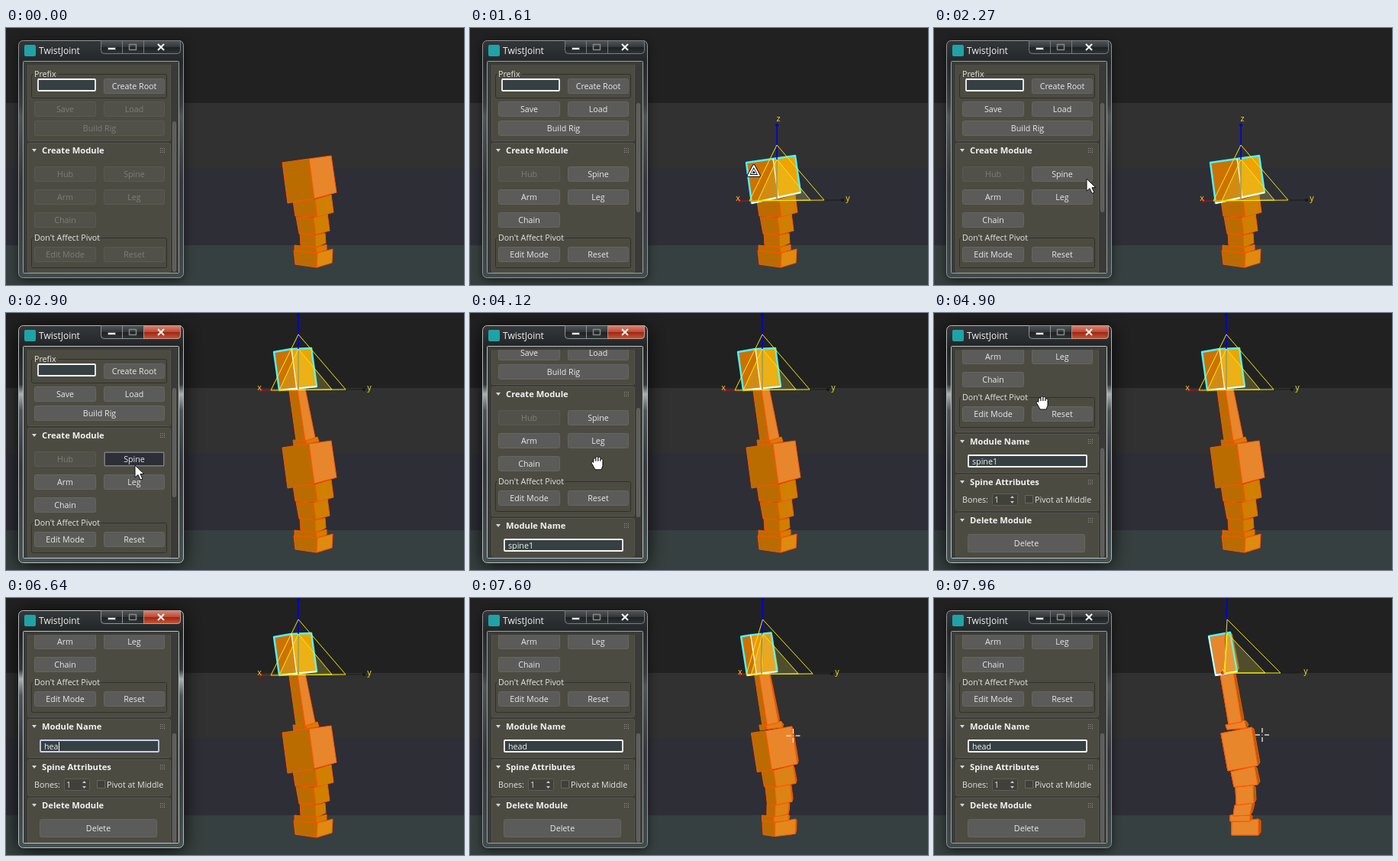
These frames come from a looping animation (600x336 px, 8000 ms). An HTML page with a canvas:

```html
<!DOCTYPE html>
<html lang="en">
<head>
<meta charset="utf-8">
<title>Rig panel</title>
<style>
html, body { margin: 0; width: 100%; height: 100%; overflow: hidden; background: #212121; }
canvas { display: block; width: 100%; height: 100%; }
</style>
</head>
<body>
<canvas id="stage" width="600" height="336"></canvas>
<script>
const LOOP = 8000;
const ctx = document.getElementById('stage').getContext('2d');
const FONT = '"Open Sans", sans-serif';

// ---------- helpers ----------
const mix = (a, b, u) => a + (b - a) * u;
const mixPoint = (p, q, u) => [mix(p[0], q[0], u), mix(p[1], q[1], u)];
const clamp = v => Math.max(0, Math.min(1, v));
const ease = u => u * u * (3 - 2 * u);

// keys: [time, ...values]
function track(keys, t) {
  let i = 0;
  while (i < keys.length - 2 && t >= keys[i + 1][0]) i++;
  const [a, b] = [keys[i], keys[i + 1]];
  const u = clamp((t - a[0]) / (b[0] - a[0]));
  return a.slice(1).map((v, k) => mix(v, b[k + 1], u));
}
function rect(x, y, w, h, fill, stroke, radius = 0, line = 1) {
  ctx.beginPath();
  ctx.roundRect(x, y, w, h, radius);
  if (fill) { ctx.fillStyle = fill; ctx.fill(); }
  if (stroke) { ctx.strokeStyle = stroke; ctx.lineWidth = line; ctx.stroke(); }
}
function poly(points, fill, stroke, line = 1, closed = true) {
  ctx.beginPath();
  points.forEach(p => ctx.lineTo(p[0], p[1]));
  if (closed) ctx.closePath();
  if (fill) { ctx.fillStyle = fill; ctx.fill(); }
  if (stroke) { ctx.strokeStyle = stroke; ctx.lineWidth = line; ctx.lineJoin = 'round'; ctx.stroke(); }
}
const path = (points, stroke, line) => poly(points, null, stroke, line, false);
function text(s, x, y, color = '#e4e4e4', align = 'left', font = '10.7px') {
  ctx.font = `${font} ${FONT}`;
  ctx.textAlign = align;
  ctx.textBaseline = 'alphabetic';
  ctx.fillStyle = color;
  ctx.fillText(s, x, y + 4);
}
function vertical(y0, y1, ...stops) {
  const g = ctx.createLinearGradient(0, y0, 0, y1);
  stops.forEach(([at, color]) => g.addColorStop(at, color));
  return g;
}

// ---------- model ----------
const pairs = list => list.reduce((out, v, i) => (i % 2 ? out[out.length - 1].push(v) : out.push([v]), out), []);

// from: top left, middle, right, then bottom right, middle, left; to: the turned front face
function box(from, to, front = '#cf8000') {
  const [tl, tr, br, bl] = pairs(to);
  return { from: pairs(from), to: [tl, tl, tr, br, bl, bl], front };
}
const base = box([377,291, 408,294, 428,289, 427,307, 407,313, 379,309], [390,293, 425,289, 425,310, 390,310], '#e08a10');
const slab = box([378,284, 406,287, 420,283, 420,290, 407,294, 378,291], [388,284, 414,283, 414,292, 388,292]);
const shin = box([385,268, 405,271, 418,268, 419,281, 406,287, 386,284], [394,271, 417,267, 414,284, 392,285]);
const thigh = box([380,247, 403,248, 421,242, 424,265, 406,270, 384,269], [395,247, 418,245, 419,268, 396,271]);
const hip = box([376,226, 405,224, 426,218, 429,241, 408,247, 379,246], [389,227, 420,220, 424,244, 393,247]);
const torso = box([362,176, 397,171, 426,167, 433,215, 404,223, 369,229], [376,177, 416,169, 424,219, 385,226], '#e8862c');
const collar = box([376,166, 393,167, 408,162, 410,168, 394,171, 377,174], [382,166, 407,160, 409,170, 384,172]);
const neck = box([371,102, 382,101, 392,99, 405,163, 392,167, 380,166], [375,100, 392,97, 403,162, 386,165], '#e8862c');
const head = box([351,51, 374,47, 400,46, 407,96, 381,101, 358,101], [360,50, 388,45, 397,96, 369,101], '#eea400');

const body = [base, slab, shin, thigh, hip, torso];
const grown = [base, slab, shin, thigh, hip, collar, neck, torso, head];

function drawBox(b, u, selected) {
  const [tl, tm, tr, br, bm, bl] = b.from.map((p, i) => mixPoint(p, b.to[i], u));
  const edge = selected ? null : '#ff5500';
  const side = 3 * u;
  if (u > 0) poly([tr, [tr[0] + side, tr[1] + 2], [br[0] + side, br[1] - 4], br], '#a86200', edge);
  poly([tl, tm, bm, bl], selected ? '#cc7200' : '#bb6c00', edge);
  ctx.globalAlpha = 1;
  poly([tm, tr, br, bm], selected ? '#eea400' : b.front, edge);
  if (u > 0) {
    ctx.globalAlpha = u;
    poly([tm, tr, br, bm], '#e8862c', edge);
    ctx.globalAlpha = 1;
  }
  if (!selected) return;
  poly([tl, tm, tr, br, bl], null, '#4cf4ff', 2.4);
  path([tm, bm], '#fff', 1.3);
  path([bl, br], '#fff', 1.8);
}

function drawGizmo(u, dx, dy) {
  const at = (x0, y0, x1, y1) => [mix(x0, x1, u) + dx, mix(y0, y1, u) + dy];
  const origin = at(383, 101, 381, 98);
  const apex = at(383, 28, 384, 28), innerApex = at(383, 47, 384, 46);
  const left = at(347, 101, 380, 98), innerLeft = at(358, 101, 381, 98);
  const right = at(445, 100, 454, 98), innerRight = at(427, 100, 434, 98);
  const tipX = at(334, 101, 378, 98), tipY = at(469, 100, 480, 98), tipZ = at(383, 2, 384, -2);
  path([origin, tipZ], '#0000d8', 1.5);
  path([origin, tipX], '#b01818');
  path([right, tipY], '#1a1a1a');
  poly([innerApex, innerLeft, innerRight], 'rgba(225,215,90,.24)');
  poly([apex, left, right], null, '#f8ec00');
  poly([innerApex, innerLeft, innerRight], null, '#f8ec00');
  path([innerApex, origin], '#f8ec00');
  rect(tipZ[0] - 2, tipZ[1] - 2, 4, 4, '#0000c8', null, 2);
  rect(tipX[0] - 2, tipX[1] - 2, 4, 4, '#c01010', null, 2);
  if (u < 1) rect(tipY[0] - 2, tipY[1] - 2, 4, 4, '#15151c', null, 2);
  const [lx, ly] = at(332, 97, 380, 95), [yx, yy] = at(476, 97, 487, 95);
  text('x', lx, ly, '#ffd22a', 'center');
  text('y', yx, yy, '#f4e71c', 'center');
  text('z', tipZ[0] + 2, tipZ[1] - 9, '#f4e71c', 'center');
}

function drawViewport(t) {
  [[0, 98, '#212121'], [98, 85, '#313131'], [183, 101, '#2e2e37'], [284, 52, '#374040']]
    .forEach(([y, h, color]) => rect(0, y, 600, h, color));
  const turn = clamp((t - 7300) / 660);
  const extended = t >= 2840;
  const active = extended ? head : t >= 1210 ? torso : null;
  (extended ? grown : body).forEach(b => drawBox(b, turn, b === active));
  if (active === head) drawGizmo(turn, 0, 0);
  else if (active) drawGizmo(0, 19, 125);
}

// ---------- window ----------
function drawFrame(active) {
  ctx.save();
  ctx.shadowColor = active ? 'rgba(0,0,0,.85)' : 'rgba(0,0,0,.6)';
  ctx.shadowBlur = active ? 26 : 14;
  ctx.shadowOffsetY = 3;
  rect(16.5, 16.5, 216, 310, '#202426', null, 6);
  ctx.restore();
  const glass = active
    ? vertical(16, 326, [0, '#36393b'], [.1, '#202325'], [.25, '#34383a'], [.29, '#aab0b2'], [.36, '#4d5558'], [.6, '#34383f'], [1, '#465252'])
    : vertical(16, 326, [0, '#34373a'], [.09, '#24272a'], [.27, '#3a3d3f'], [.32, '#505557'], [.6, '#34373c'], [1, '#414b4b']);
  rect(16.5, 16.5, 216, 310, glass, active ? '#b4babc' : '#8f9597', 6);
  rect(22.5, 43.5, 204, 277, '#3b3c38', active ? '#bcc2c4' : '#9aa0a2', 1);

  rect(24, 22, 15, 15, '#1fa3a6', null, 2);
  text('TwistJoint', 43, 30, '#f2f2f2', 'left', '12px');

  const light = active ? '#8f9496' : '#777c7e';
  rect(124.5, 16.5, 104, 17, vertical(16, 34, [0, '#54585a'], [.48, '#34383a'], [.5, '#1e2123'], [1, '#303537']), light, [0, 0, 4, 4]);
  if (active) rect(180.5, 16.5, 48, 17, vertical(16, 34, [0, '#d88a78'], [.48, '#be4b37'], [.5, '#9e2413'], [1, '#cb5a37']), '#c49a92', [0, 0, 4, 0]);
  path([[152.5, 17], [152.5, 33]], light);
  path([[180.5, 17], [180.5, 33]], light);
  rect(133.5, 25.5, 10, 3, '#f0f0f0', '#555');
  rect(161.5, 21.5, 9, 7, null, '#888', 0, 1.5);
  path([[199, 21], [207, 29]], '#f2f2f2', 2.2);
  path([[207, 21], [199, 29]], '#f2f2f2', 2.2);
}

function button(label, x, y, w, { h = 20, enabled = true, state = '' } = {}) {
  const fill = state ? '#2d2e38' : enabled ? '#5b5b59' : '#515149';
  rect(x + .5, y + .5, w - 1, h - 1, fill, enabled ? '#66665f' : '#5a5a52', 2);
  if (state === 'focus') {
    ctx.setLineDash([1, 1]);
    rect(x + 1.5, y + 1.5, w - 3, h - 3, null, '#c8c8c8');
    ctx.setLineDash([]);
  }
  text(label, x + w / 2, y + h / 2, enabled ? '#e8e8e8' : '#7e7e78', 'center');
}
function rollout(title, y, h) {
  rect(28.5, y + .5, 187, h - 1, '#4b4b42', '#55554d', 2);
  if (!title) return;
  poly([[34, y + 8], [40, y + 8], [37, y + 12]], '#d8d8d8');
  text(title, 47, y + 10, '#f2f2f2', 'left', 'bold 11.2px');
  for (let i = 0; i < 9; i++) rect(202 + i % 3 * 2.5, y + 7 + Math.floor(i / 3) * 2.5, 1, 1, '#96968e');
}
function group(title, y, h, titleWidth) {
  rect(33.5, y + .5, 177, h, null, '#30302c', 2);
  rect(36, y - 2, titleWidth, 5, '#4b4b42');
  text(title, 37, y);
}
function field(x, y, w, border = '#f6f6f6') {
  rect(x + 1, y + 1, w - 2, 15, '#364042', border, 1, 1.8);
}

const typed = [[0, 'spine1'], [6200, ''], [6300, 'h'], [6460, 'he'], [6580, 'hea'], [6740, 'head']];
const scrollKeys = [[3940, 0], [4120, 54], [4540, 164]];

function drawNameField(t) {
  const editing = t >= 5440 && t < 7360;
  field(44, 349, 157, editing ? '#c9d0ec' : '#f6f6f6');
  const value = typed.filter(([from]) => t >= from).pop()[1];
  ctx.font = `10.7px ${FONT}`;
  const width = ctx.measureText(value).width;
  if (t >= 5560 && t < 6200) rect(50, 352, width * clamp((t - 5500) / 180), 12, '#4f78b4');
  text(value, 50, 358, '#f0f0f0');
  if (editing && t >= 6200) rect(50.5 + width, 352, 1, 12, '#fff');
}

function drawPanel(t) {
  const ready = t >= 1210;
  const [scroll] = track(scrollKeys, t);
  const spine = t >= 2650 && t < 3300 ? 'focus' : t >= 2330 && t < 3560 ? 'hover' : '';
  const on = { enabled: ready }, off = { enabled: false };
  ctx.save();
  ctx.beginPath();
  ctx.rect(27, 48, 197, 272);
  ctx.clip();
  ctx.save();
  ctx.translate(0, -Math.round(scroll));

  rollout('', 36, 112);
  group('Prefix', 60, 31, 32);
  field(41, 66, 77);
  button('Create Root', 128, 66, 80);
  button('Save', 37, 96, 81, on);
  button('Load', 128, 96, 80, on);
  button('Build Rig', 37, 121, 171, on);

  rollout('Create Module', 150, 170);
  button('Hub', 37, 181, 81, off);
  button('Spine', 128, 181, 80, { enabled: ready, state: spine });
  button('Arm', 37, 211, 81, on);
  button('Leg', 128, 211, 80, on);
  button('Chain', 37, 241, 81, on);
  group("Don't Affect Pivot", 274, 39, 88);
  button('Edit Mode', 37, 286, 81, on);
  button('Reset', 128, 286, 80, on);

  rollout('Module Name', 322, 51);
  drawNameField(t);

  rollout('Spine Attributes', 375, 48);
  text('Bones:', 37, 408);
  rect(76.5, 400.5, 33, 15, '#40413b', '#5e5e56', 1);
  text('1', 79, 408);
  poly([[100, 406], [105, 406], [102.5, 403]], '#c8c8c8');
  poly([[100, 410], [105, 410], [102.5, 413]], '#c8c8c8');
  rect(119.5, 402.5, 10, 10, '#3f403a', '#66665e');
  text('Pivot at Middle', 132, 408);

  rollout('Delete Module', 425, 60);
  button('Delete', 44, 453, 154, { h: 24 });
  ctx.restore();

  rect(217, 48, 7, 272, '#3a3b38');
  rect(218.5, ready ? 98.5 + scroll * .48 : 122.5, 4, ready ? 142 : 196, '#5c5c58', '#686863', 2);
  ctx.restore();
}

// ---------- pointers ----------
const pointers = {
  arrow() {
    poly([[0, 0], [0, 16], [4, 12.5], [7, 19], [10, 18], [7, 11.5], [12, 11.5]], '#fff', '#111');
  },
  cross() {
    [[1, 0], [-1, 0], [0, 1], [0, -1]].forEach(([x, y]) => path([[x * 3, y * 3], [x * 9, y * 9]], '#fff', 1.2));
    rect(-.5, -.5, 1, 1, '#fff');
  },
  scale() {
    const triangle = [[0, -7], [7, 6], [-7, 6]];
    poly(triangle, '#111', '#111', 4);
    poly(triangle, null, '#fff', 2);
    poly([[0, -2], [3, 3.5], [-3, 3.5]], '#111', '#fff', 1.2);
  },
  hand() {
    const fingers = [[-4.5, -6, 9], [-1.5, -8, 11], [1.5, -7.5, 11], [4.5, -5, 9]];
    fingers.forEach(([x, y, h]) => rect(x - 1.5, y, 3, h, '#fff', '#111', 1.5));
    poly([[-6, 0], [-8, -2], [-9, 0], [-5, 7], [-4, 9], [4, 9], [6, 4], [6, -2], [-6, -2]], '#fff');
    path([[-6, 0], [-8, -2], [-9, 0], [-5, 7], [-4, 9], [4, 9], [6, 4], [6, -2]], '#111');
  },
  beam() {
    path([[0, -7], [0, 7]], '#fff', 1.2);
    path([[-3, -8], [3, -8]], '#fff');
    path([[-3, 8], [3, 8]], '#fff');
  }
};
const moves = [
  [460, 444, 215], [820, 372, 187], [1610, 372, 187], [2390, 169, 199], [3440, 169, 199],
  [3740, 168, 245], [3940, 168, 245], [4120, 168, 196], [4540, 148, 128], [4780, 143, 117],
  [4960, 143, 117], [5440, 90, 193], [5500, 90, 193], [5680, 50, 193], [6240, 50, 193],
  [6800, 120, 198], [7300, 418, 181], [7960, 430, 179]
];
const shapes = [
  [0, ''], [460, 'cross'], [1210, 'scale'], [1660, 'arrow'], [3940, 'hand'], [4960, 'arrow'],
  [5400, 'beam'], [6200, ''], [6820, 'arrow'], [7030, 'cross']
];
function drawPointer(t) {
  const shape = shapes.filter(([from]) => t >= from).pop()[1];
  if (!shape) return;
  const [x, y] = track(moves, t);
  ctx.save();
  ctx.translate(x, y);
  pointers[shape]();
  ctx.restore();
}

function draw(now) {
  const t = now % LOOP;
  drawViewport(t);
  drawFrame(t >= 2650 && t < 7360);
  drawPanel(t);
  drawPointer(t);
  requestAnimationFrame(draw);
}
requestAnimationFrame(draw);
</script>
</body>
</html>
```
